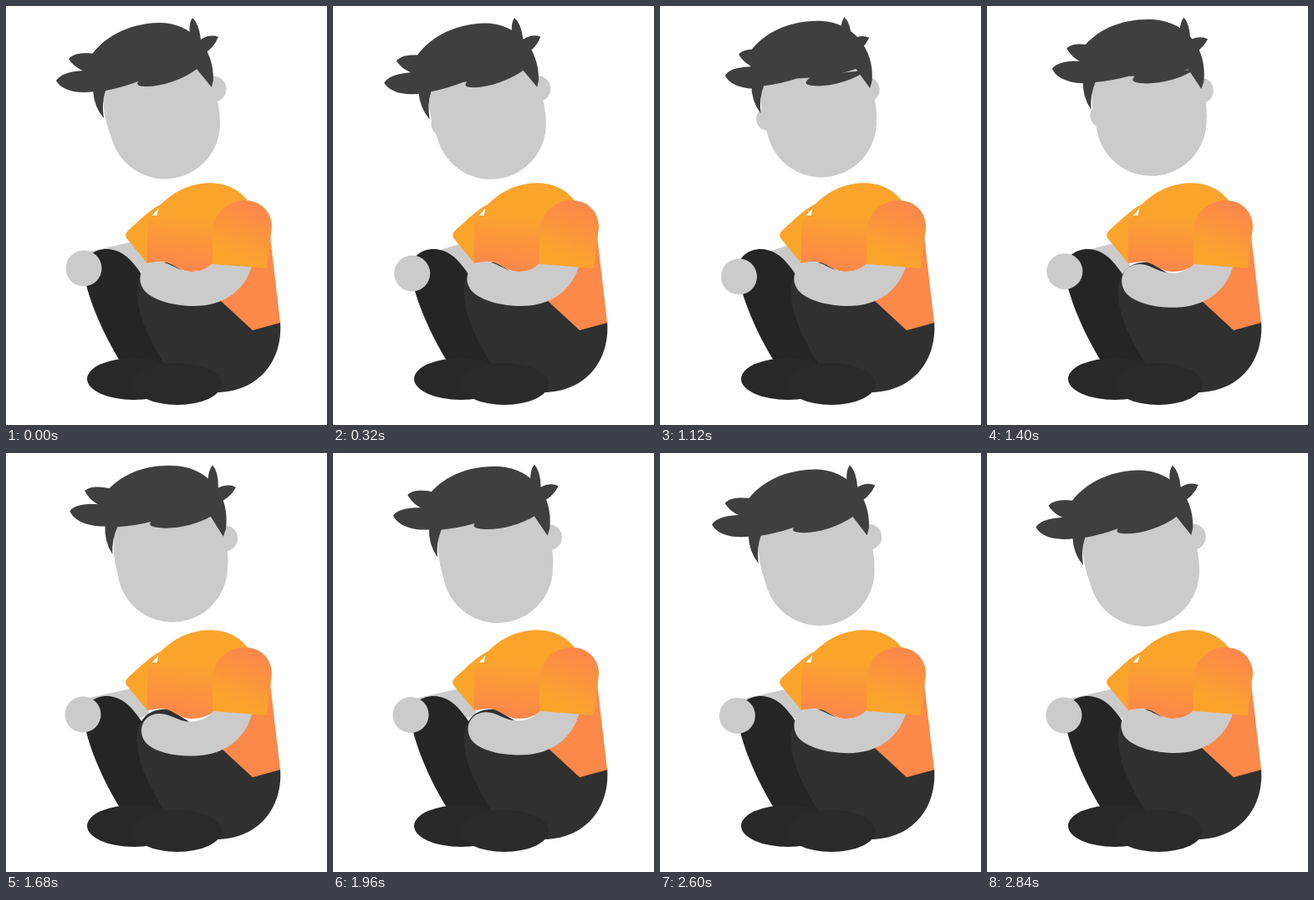
An HTML page for the animation above (2880 ms loop, 384x500 px).

```html
<!DOCTYPE html>
<html lang="en">
<head>
<meta charset="utf-8">
<title>Sitting figure</title>
<style>
  html, body { margin: 0; width: 100%; height: 100%; overflow: hidden; background: #fff; }
  svg { display: block; width: 100%; height: 100%; }
  .skin { fill: #cbcbcb; }
  .hair { fill: #3f3f3f; }
  .shirt { fill: #faa42c; }
  #forearm { stroke: #cbcbcb; stroke-width: 36; }
</style>
</head>
<body>
<svg viewBox="0 0 384 500">
  <defs>
    <linearGradient id="chestShade" gradientUnits="userSpaceOnUse" x1="213" y1="246" x2="205" y2="312">
      <stop stop-color="#faa42c"/><stop offset="1" stop-color="#fc884a"/>
    </linearGradient>
    <linearGradient id="sleeveShade" gradientUnits="userSpaceOnUse" x1="294" y1="238" x2="270" y2="299">
      <stop stop-color="#fc884a"/><stop offset="1" stop-color="#faa42c"/>
    </linearGradient>
  </defs>

  <line id="forearm"/>

  <!-- legs and shoes -->
  <path fill="#252525" d="M134 420C112 383 97 345 93 318C92 300 105 290 121 290C140 291 150 303 162 320L200 430L150 440Z"/>
  <ellipse cx="153" cy="445" rx="56" ry="25" fill="#282828"/>
  <path fill="#303030" d="M157 345C155 320 170 303 195 306L260 345L295 384L328 376C332 425 300 461 252 461L190 428C170 395 158 370 157 345Z"/>
  <ellipse cx="205" cy="451" rx="53" ry="25" fill="#2a2a2a"/>

  <!-- shirt -->
  <path fill="#fc884a" d="M240 290L316 275L328 378L295 387L257 352Z"/>
  <path class="shirt" d="M183 239C205 216 230 210 250 211.500C270 213 284 224 291 235L300 300L247 305L170 300Z"/>
  <path fill="url(#chestShade)" d="M169 250H250V308Q236 318 220 317C206 316 199 305 185 305L169 307Z"/>
  <path class="shirt" d="M190 235C174 240 160 256 146 268Q141 273 145 278L169 307V262Q172 249 190 235Z"/>

  <path id="arm" class="skin" d="M294 311C285 340 260 358 225 358C200 358 178 351 168 342C154 329 160 305 182 305C196 305 205 317 222 317C235 317 245 311 250 303Z"/>
  <path fill="url(#sleeveShade)" d="M247 308V268C249 245 266 232 286 232C305 232 318 246 318 264L312 313Z"/>
  <circle id="hand" class="skin" r="21.500"/>

  <g id="head">
    <circle id="earNear" class="skin" cx="135" cy="140" r="14"/>
    <circle id="earFar" class="skin" cx="248" cy="99" r="15.500"/>
    <path class="skin" d="M120 90L116 106Q116 125 121 142L128 163A66 66 0 0 0 256 140Q256 115 247 95L220 60H140Z"/>
    <g class="hair">
      <path d="M117 134Q105 120 104 100L100 62C115 38 145 21 183 20C222 20 249 50 248 88L246 97L228 75C205 85 180 88 158 90Q140 97 119 101Q114 116 117 134Z"/>
      <g id="locks">
        <path d="M60 89C66 80 80 78 92 77C84 74 78 68 75 63C82 55 97 56 106 57L120 60L106 102C88 105 67 102 60 89Z"/>
        <path d="M165 84C158 89 155 93 159 95C175 99 208 91 230 74Z"/>
      </g>
      <path id="tuft" d="M223 14C218 21 218 36 226 50L232 60Q248 52 254 37Q244 33 233 40Q231 21 223 14Z"/>
    </g>
  </g>
</svg>
<script>
const LOOP = 2880;
// time, head x, head y, head tilt, head turn, hand x, hand y, arm tilt
const poses = [
  [0, 190, 140.5, 0, 0, 93, 313, 0],
  [240, 188.7, 141, -0.8, 2, 94, 317, 0],
  [640, 190, 140, 0, 8, 97.5, 327, 0],
  [1120, 193, 138.5, 3, 12, 94.5, 323, 0],
  [1680, 199, 136, 7, 0, 92, 312, -3.5],
  [1960, 197, 137, 5, 0, 93, 312.5, -2.5],
  [2320, 195, 138.5, 2.7, 0, 93, 314, -0.7],
  [2840, 188, 141, 0.4, 0, 92, 313, 0],
  [2880, 190, 140.5, 0, 0, 93, 313, 0]
];
const part = id => document.getElementById(id);
const setAll = (id, attrs) => {
  for (const name in attrs) part(id).setAttribute(name, attrs[name]);
};
const move = (id, value) => part(id).setAttribute('transform', value);

const slope = (i, c) => (poses[i + 1][c] - poses[i][c]) / (poses[i + 1][0] - poses[i][0]);

// Flat at turning points, harmonic mean elsewhere, so nothing overshoots.
function tangent(i, c) {
  if (i === 0 || i === poses.length - 1) return 0;
  const a = slope(i - 1, c), b = slope(i, c);
  return a * b > 0 ? 2 * a * b / (a + b) : 0;
}

function valueAt(time, c) {
  let i = 0;
  while (time >= poses[i + 1][0]) i++;
  const span = poses[i + 1][0] - poses[i][0];
  const u = (time - poses[i][0]) / span, v = 1 - u;
  return v * v * (1 + 2 * u) * poses[i][c] + u * u * (3 - 2 * u) * poses[i + 1][c]
    + span * u * v * (v * tangent(i, c) - u * tangent(i + 1, c));
}

function draw(time) {
  const [x, y, tilt, turn, handX, handY, armTilt] = [1, 2, 3, 4, 5, 6, 7].map(c => valueAt(time, c));
  move('head', `translate(${x - 190} ${y - 140.5}) rotate(${tilt} 190 140.5)`);
  move('locks', `translate(${turn} ${turn * 0.15})`);
  move('tuft', `translate(${-turn})`);
  move('earNear', `translate(${-turn * 0.75})`);
  move('earFar', `translate(${-turn * 0.5})`);
  move('arm', `rotate(${armTilt} 280 302)`);
  setAll('hand', { cx: handX, cy: handY });
  setAll('forearm', { x1: handX, y1: handY, x2: 168, y2: 296 + (handY - 313) * 0.4 });
}

const start = performance.now();
function tick(now) {
  draw(Math.max(0, now - start) % LOOP);
  requestAnimationFrame(tick);
}
draw(0);
requestAnimationFrame(tick);
</script>
</body>
</html>
```
